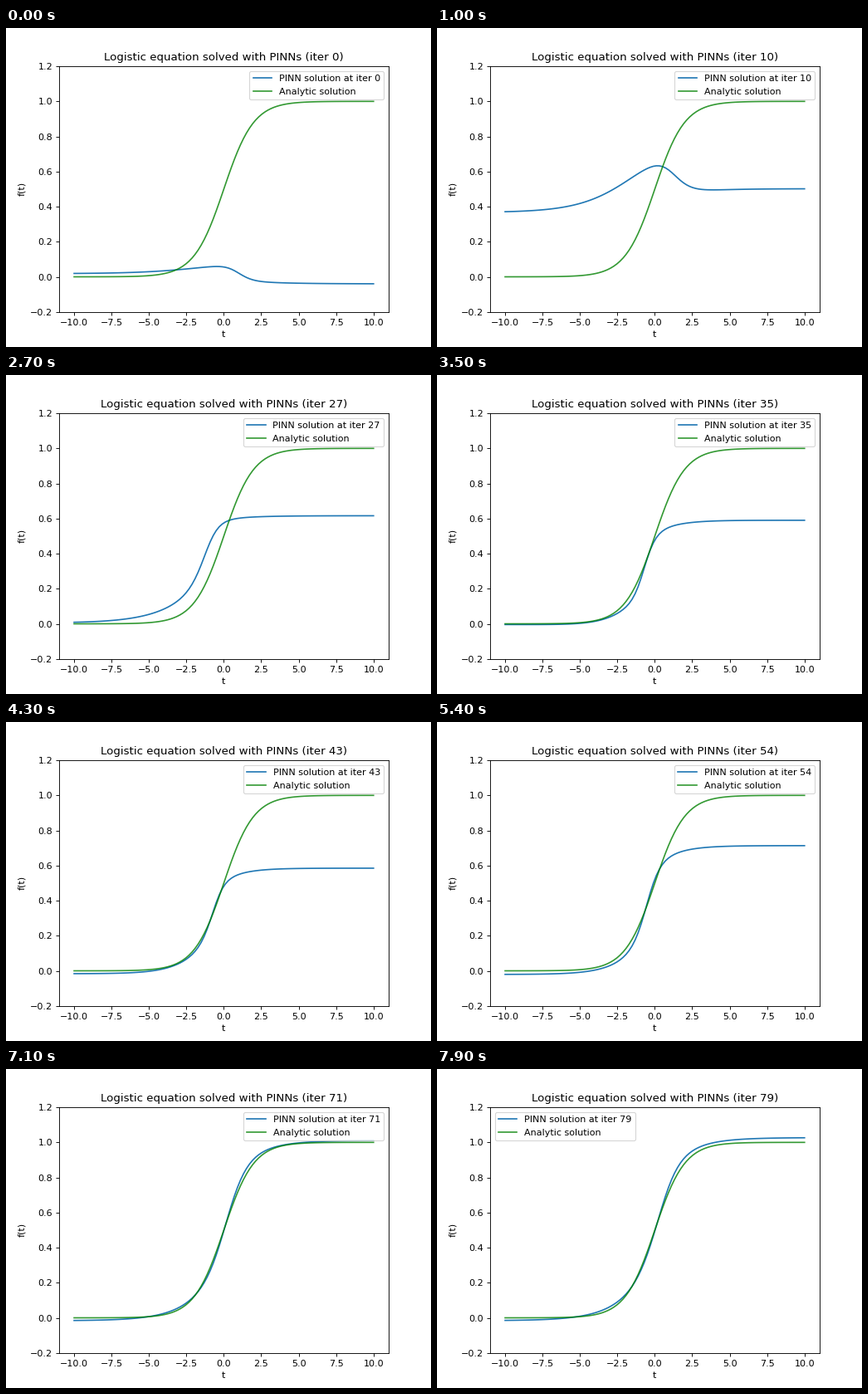
Animation of 512 by 384 pixels, one loop 8000 ms. Source, as a matplotlib script:

```python
import numpy as np
import matplotlib.pyplot as plt
from matplotlib.animation import FuncAnimation

FRAMES, STEP_MS = 80, 100
t = np.linspace(-10, 10, 100)


def sigmoid(x):
    return 1 / (1 + np.exp(-x))


def mix(a, b, s):
    return a + (b - a) * s


def hump(lo, height, c1, w1, drop, c2, w2):
    """Slow rise around c1, cut back by a sharper fall around c2."""
    return lo + height * sigmoid((t - c1) / w1) * (1 - drop * sigmoid((t - c2) / w2))


def rise(lo, hi, rate, shift, kink, c, w):
    """Logistic step from lo to hi that steepens around c."""
    return mix(lo, hi, sigmoid(rate * t + shift + kink * np.tanh((t - c) / w)))


def spline(x, y, q):
    """Natural cubic spline through the rows of y, evaluated at q."""
    n, h = len(x), np.diff(x)
    slope = np.diff(y, axis=0) / h[:, None]
    a, rhs = np.eye(n), np.zeros_like(y)
    for i in range(1, n - 1):
        a[i, i - 1:i + 2] = h[i - 1], 2 * (h[i - 1] + h[i]), h[i]
        rhs[i] = 6 * (slope[i] - slope[i - 1])
    m = np.linalg.solve(a, rhs)
    k = np.clip(np.searchsorted(x, q) - 1, 0, n - 2)
    d, hk = (q - x[k])[:, None], h[k][:, None]
    c1 = slope[k] - hk * (2 * m[k] + m[k + 1]) / 6
    return y[k] + d * (c1 + d * (m[k] / 2 + d * (m[k + 1] - m[k]) / (6 * hk)))


start = hump(0.018, 0.08, -1.0, 2.2, 1.725, 0.9, 0.47)
bulge = hump(0.367, 0.45, -1.1, 1.9, 0.70, 1.17, 0.58)
early = rise(0.005, 0.616, 0.52, 1.80, 1.65, -0.75, 1.35)
low = rise(-0.0165, 0.585, 0.75, 1.05, 1.05, -0.56, 1.0)
mid = rise(-0.0205, 0.7135, 0.72, 0.66, 1.14, -0.42, 1.2)
high = rise(-0.0195, 0.879, 0.68, 0.33, 1.28, -0.05, 1.55)
final = rise(-0.016, 1.027, 0.58, 0.27, 1.08, 0.58, 1.95)

# Training states by iteration, with the overshoots in between
stages = {
    0: start,
    10: bulge,
    19: early - 0.107,
    27: early,
    38: mix(early, low, 1.4),
    43: low,
    54: mid,
    63: high,
    72: mix(high, final, 0.95),
    79: final,
}
curves = spline(np.array(list(stages)), np.array(list(stages.values())),
                np.arange(FRAMES))

fig, ax = plt.subplots(figsize=(6.4, 4.8), dpi=80)
pinn, = ax.plot(t, curves[0])
ax.plot(t, sigmoid(t), color="g", alpha=0.8, label="Analytic solution")
ax.set(xlabel="t", ylabel="f(t)", xlim=(-11, 11), ylim=(-0.2, 1.2))


def update(i):
    pinn.set_ydata(curves[i])
    pinn.set_label(f"PINN solution at iter {i}")
    ax.set_title(f"Logistic equation solved with PINNs (iter {i})")
    ax.legend(loc="best")
    return []


anim = FuncAnimation(fig, update, frames=FRAMES, interval=STEP_MS,
                     init_func=lambda: update(0), repeat=True, repeat_delay=0)
plt.show()
```
